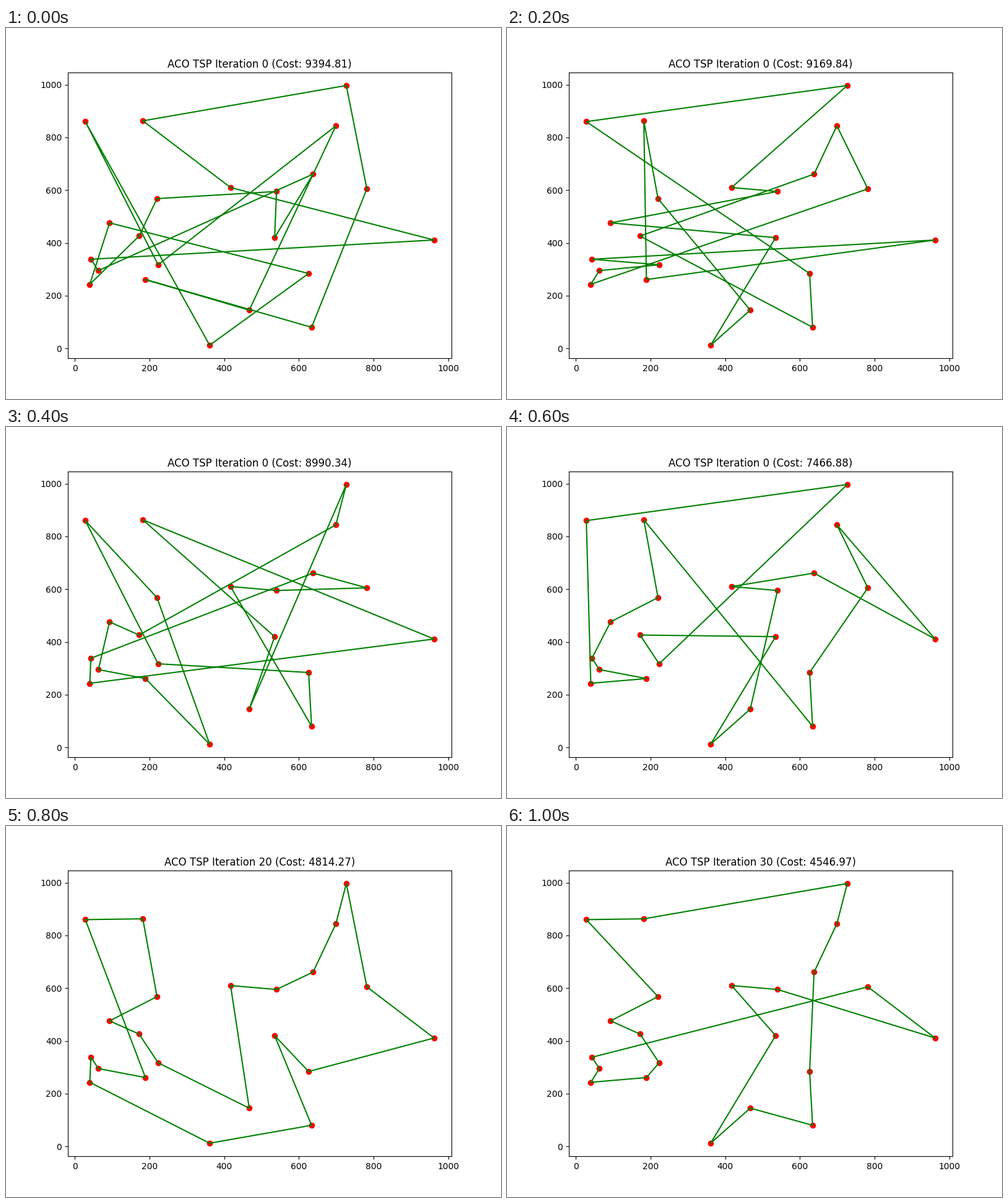
A matplotlib script that plays this animation: 800 px wide and 600 px high, repeating every 1200 ms.

```python
import matplotlib.pyplot as plt
from matplotlib.animation import FuncAnimation

CITIES = {
    "A": (28, 860), "B": (182, 863), "C": (727, 997), "D": (699, 844),
    "E": (638, 661), "F": (782, 605), "G": (417, 610), "H": (540, 595),
    "I": (220, 568), "J": (93, 476), "K": (172, 426), "L": (535, 420),
    "M": (962, 411), "N": (43, 338), "O": (63, 295), "P": (223, 317),
    "Q": (40, 243), "R": (189, 261), "S": (626, 284), "T": (467, 145),
    "U": (634, 80), "V": (361, 12),
}

# Each improvement found: iteration, tour cost, visiting order
STEPS = [
    (0, 9394.81, "UFCBGMNOELHIKQJSVAPDTR"),
    (0, 9169.84, "CASUKEDFQOPNMRBITVLJHG"),
    (0, 8990.34, "CDKJORVIAPSUGHFENQMBLT"),
    (0, 7466.88, "CAQRONJIBUSFDMEGHTVLKP"),
    (20, 4814.27, "ABIJKPTGHEDCFMSLUVQNOR"),
    (30, 4546.97, "CBAIJKPRQONFMHGLVTUSED"),
]

fig, ax = plt.subplots(figsize=(8, 6), dpi=100)
ax.scatter(*zip(*CITIES.values()), c="red")
route, = ax.plot([], [], color="green", linewidth=1.5)
title = ax.set_title("")


def padded(low, high, margin=0.05):
    pad = margin * (high - low)
    return low - pad, high + pad


ax.set_xlim(*padded(28, 962))
ax.set_ylim(*padded(12, 997))


def update(frame):
    iteration, cost, order = STEPS[frame]
    closed = order + order[0]
    route.set_data(*zip(*(CITIES[name] for name in closed)))
    title.set_text(f"ACO TSP Iteration {iteration} (Cost: {cost:.2f})")
    return route, title


anim = FuncAnimation(fig, update, frames=len(STEPS), interval=200,
                     repeat=True, repeat_delay=0, blit=False)
plt.show()
```
